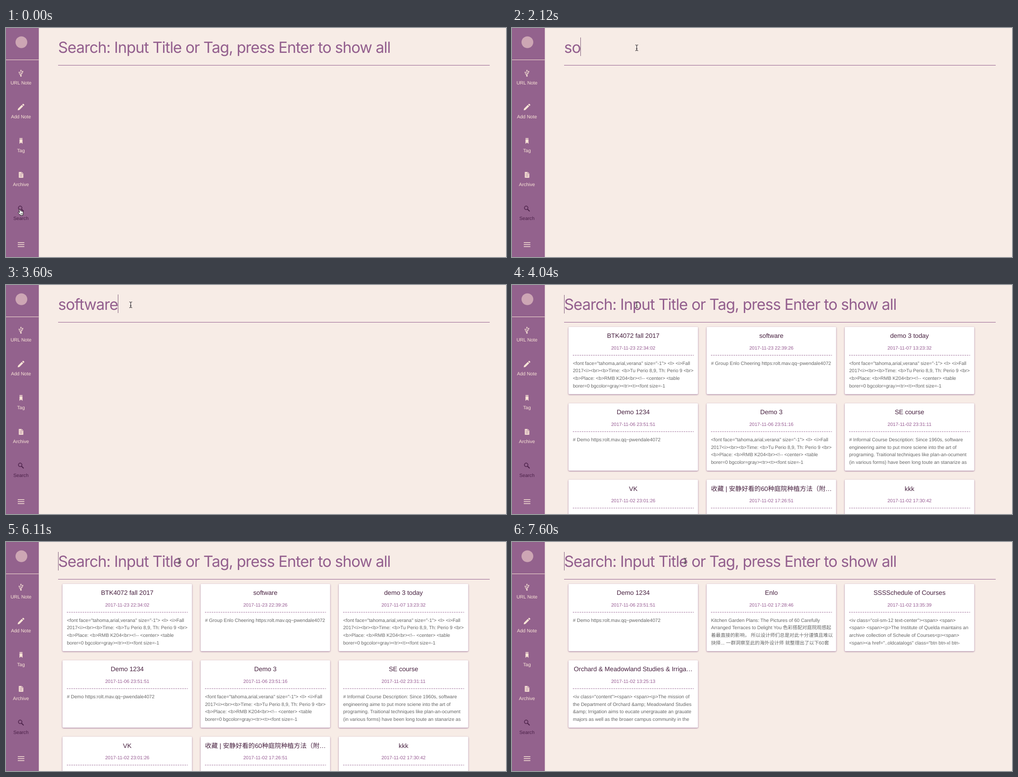
Recreate the animation shown at these times as an HTML page. Size 1104 by 507 pixels, loop 8000 ms.

```html
<!DOCTYPE html>
<html lang="en">
<head>
<meta charset="utf-8">
<title>Note search</title>
<style>
  html, body { margin: 0; width: 100%; height: 100%; overflow: hidden; background: #f7ece6; }
  svg { display: block; width: 100vw; height: 100vh; }
  text { font-family: "Liberation Sans", "Noto Sans CJK SC", "Noto Sans CJK", sans-serif; text-rendering: geometricPrecision; }
  .label { font-size: 10.6px; fill: #f9e4d6; text-anchor: middle; }
  .active { fill: #4b2149; }
  .query { font: 400 34px Inter, sans-serif; font-optical-sizing: none; letter-spacing: -1.04px; fill: #935f8e; }
  .card { fill: #fff; filter: drop-shadow(0 1px 1.4px rgba(105, 45, 105, .65)); }
  .title { font-size: 14.1px; fill: #47203f; text-anchor: middle; }
  .date { font-size: 10.6px; fill: #965a92; text-anchor: middle; }
  .body { font-size: 10.65px; fill: #666; }
</style>
</head>
<body>
<svg id="stage" viewBox="0 0 1104 507" preserveAspectRatio="xMinYMin meet">
  <rect width="1104" height="507" fill="#f7ece6"/>
  <rect width="72.5" height="507" fill="#93628d"/>
  <path d="M0 70.5H72.5" stroke="#f9e4d6"/>
  <circle cx="34" cy="31.5" r="13" fill="#cda6b4"/>

  <g fill="#f9e4d6">
    <g fill="none" stroke="#f9e4d6" stroke-width="1.2">
      <path d="M33 94V106M33 104.5Q29.3 103 29.3 98.5M33 102.5Q36.7 101.5 36.7 96.5"/>
    </g>
    <path d="M33 92L34.7 95H31.3Z"/>
    <circle cx="33" cy="106" r="1.7"/>
    <circle cx="29.3" cy="98" r="1.2"/>
    <rect x="35.5" y="95.2" width="2.4" height="2.4"/>

    <path d="M25.8 182.2L26.6 178.6L34.9 170.3L37.9 173.3L29.6 181.6ZM35.7 169.5L37 168.2Q37.9 167.4 38.8 168.2L40.1 169.5Q40.8 170.4 40.1 171.2L38.7 172.5Z"/>

    <path d="M29.8 243.8H36.4V245.6H29.8ZM29.8 246.4H36.4V256.4L33.1 253.6L29.8 256.4Z"/>

    <path d="M28.3 318.8H34.8L38.2 322.2V331.4H28.3Z"/>
    <path d="M34.5 319.2V322.5H37.8M30.2 322.2H32.8M30.2 325.2H36.3M30.2 328.2H36.3" fill="none" stroke="#93628d" stroke-width=".9"/>
  </g>
  <g fill="none" stroke="#4b2149">
    <circle cx="31.3" cy="398.2" r="3.9" stroke-width="1.5"/>
    <path d="M34.3 401.2L39 405.9" stroke-width="2"/>
  </g>
  <path d="M26 475.3H40.5M26 479.6H40.5M26 483.9H40.5" stroke="#f9e4d6" stroke-width="1.5"/>
  <g id="menu"></g>

  <path d="M115 82.5H1068" stroke="#935f8e"/>
  <g id="allNotes"></g>
  <g id="foundNotes"></g>
  <text id="query" class="query" x="115" y="55"></text>
  <rect id="caret" width="1" height="41" fill="#7d5a7a"/>

  <g id="hand" stroke="#111" stroke-width="1" stroke-linejoin="round">
    <path fill="#fff" d="M-2.6 -5.2Q-1.4 -6.6 -.3 -5L1 -1.6Q2 -2.4 2.8 -1.3Q3.9 -2 4.5 -.7Q5.6 -1.1 6 .2L6.6 3.2Q6.8 5.2 5.6 6.4V7.8L-.2 8V6.6L-4.6 2.6Q-5.4 1.2 -4.2 .8Q-3.1 .6 -1.5 2Z"/>
    <path fill="none" stroke-width=".7" d="M1 3L1.4 5.8M2.8 2.8L3.1 5.6M4.5 2.6L4.8 5.4"/>
  </g>
  <path id="arrow" fill="#111" stroke="#fff" stroke-width=".9" d="M0 0V12.5L2.9 9.8L4.8 14.2L6.8 13.3L4.9 9.1H8.9Z"/>
  <g id="beam" fill="none" stroke-linecap="round">
    <path stroke="#fff" stroke-opacity=".6" stroke-width="2.2" d="M0 -5.5V5.5"/>
    <path stroke="#1c161b" stroke-width="1.1" d="M-2.7 -6.3Q-.4 -6.3 0 -5Q.4 -6.3 2.7 -6.3M0 -5V5M-2.7 6.3Q-.4 6.3 0 5Q.4 6.3 2.7 6.3M-1.3 2.2H1.3"/>
  </g>
</svg>
<script>
const LOOP = 8000;
const PROMPT = "Search: Input Title or Tag, press Enter to show all";
const $ = id => document.getElementById(id);

function add(parent, tag, attrs, text) {
  const el = document.createElementNS("http://www.w3.org/2000/svg", tag);
  for (const key in attrs) el.setAttribute(key, attrs[key]);
  if (text) el.textContent = text;
  parent.append(el);
  return el;
}

["URL Note", "Add Note", "Tag", "Archive", "Search"].forEach((name, i) =>
  add($("menu"), "text", { class: name === "Search" ? "label active" : "label", x: 33, y: 125 + 75 * i }, name));

const markup = [
  '<font face="tahoma,arial,verana" size="-1"> <l> <i>Fall',
  "2017<i><br><b>Time: <b>Tu Perio 8,9, Th: Perio 9 <br>",
  "<b>Place: <b>RMB K204<br><!-- <center> <table",
  "borer=0 bgcolor=gray><tr><t><font size=-1"
];
const demo = ["Demo 1234", "2017-11-06 23:51:51", ["# Demo https:rolt.mav.qq~pwendale4072"]];

const allNotes = [
  ["BTK4072 fall 2017", "2017-11-23 22:34:02", markup],
  ["software", "2017-11-23 22:39:26", ["# Group Enlo Cheering https:rolt.mav.qq~pwendale4072"]],
  ["demo 3 today", "2017-11-07 13:23:32", markup],
  demo,
  ["Demo 3", "2017-11-06 23:51:16", markup],
  ["SE course", "2017-11-02 23:31:11", [
    "# Informal Course Description: Since 1960s, software",
    "engineering aime to put more sciene into the art of",
    "programing. Traitional techniques like plan-an-ocument",
    "(in various forms) have been long toute an stanarize as"]],
  ["VK", "2017-11-02 23:01:26", []],
  ["收藏 | 安静好看的60种庭院种植方法（附…", "2017-11-02 17:26:51", []],
  ["kkk", "2017-11-02 17:30:42", []]
];
const foundNotes = [
  demo,
  ["Enlo", "2017-11-02 17:28:46", [
    "Kitchen Garden Plans: The Pictures of 60 Carefully",
    "Arranged Terraces to Delight You 色彩搭配对庭院观感起",
    "着最直接的影响， 所以设计师们总是对此十分谨慎且难以",
    "抉择... 一群洞察至此的海外设计师 就整理出了以下60套"]],
  ["SSSSchedule of Courses", "2017-11-02 13:35:39", [
    '<iv class="col-sm-12 text-center"><span> <span>',
    "<span> <span><p>The Institute of Quelda maintains an",
    "archive collection of Scheule of Courses<p><span>",
    '<span><a href="..oldcatalogs" class="btn btn-xl btn-']],
  ["Orchard & Meadowland Studies & Irriga…", "2017-11-02 13:25:13", [
    '<iv class="content"><span> <span><p>The mission of',
    "the Department of Orchard &amp; Meadowland Studies",
    "&amp; Irrigation aims to eucate unergrauate an grauate",
    "majors as well as the broaer campus community in the"]]
];

function drawNotes(group, notes) {
  notes.forEach(([title, date, lines], i) => {
    const x = 124.7 + 305 * (i % 3), y = 92.7 + 169.2 * Math.floor(i / 3);
    const card = add(group, "g", { transform: `translate(${x} ${y})` });
    add(card, "rect", { class: "card", width: 286, height: 149, rx: 2 });
    add(card, "text", { class: "title", x: 143, y: 24.5 }, title);
    add(card, "text", { class: "date", x: 143, y: 50 }, date);
    add(card, "path", { d: "M9.7 62.8H276.7", stroke: "#935f8e", "stroke-dasharray": "3 2" });
    lines.forEach((line, n) => add(card, "text", { class: "body", x: 9.7, y: 84 + 16.7 * n }, line));
  });
}
drawNotes($("allNotes"), allNotes);
drawNotes($("foundNotes"), foundNotes);

// Start time of each typed state; an empty string shows the prompt.
const typing = [
  [0, ""], [1970, "s"], [2120, "so"], [2410, "sof"], [2560, "soft"], [2850, "softw"],
  [3150, "softwa"], [3450, "softwar"], [3600, "software"], [4040, ""],
  [6560, "1"], [6860, "12"], [7150, "123"], [7600, ""]
];
const caretOn = [[1370, 1820], [1970, 4640], [5080, 5520], [6110, LOOP]];

// Progress of a move that advances in equal jumps, the first at start, the last at end.
function jumps(t, start, end, count) {
  if (t < start) return 0;
  const done = Math.floor((t - start) / (end - start) * (count - 1) + 0.02) + 1;
  return Math.min(1, done / count);
}
const ease = p => p * p * (3 - 2 * p);

function pointer(t) {
  const up = ease(jumps(t, 450, 1070, 5));
  const p = jumps(t, 4640, 5520, 7);
  return {
    x: 31.6 + 243.8 * up + 107 * ease(p),
    y: 407 - 363.2 * up - 1.8 * p + 33 * Math.sin(Math.PI * p)
  };
}

function show(el, on) {
  el.style.display = on ? "" : "none";
}

function render(t) {
  const typed = typing.filter(([start]) => start <= t).pop()[1];
  const query = $("query"), text = typed || PROMPT;
  if (query.textContent !== text) query.textContent = text;

  const caret = $("caret");
  show(caret, caretOn.some(([from, to]) => t >= from && t < to));
  caret.setAttribute("x", typed ? Math.floor(115 + query.getComputedTextLength()) : 115);
  caret.setAttribute("y", typed ? 21 : 22);

  show($("allNotes"), t >= 4040 && t < 7600);
  show($("foundNotes"), t >= 7600);

  const { x, y } = pointer(t);
  const kind = t < 450 ? "hand" : y < 82 ? "beam" : "arrow";
  for (const id of ["hand", "arrow", "beam"]) show($(id), id === kind);
  $(kind).setAttribute("transform", `translate(${x.toFixed(2)} ${y.toFixed(2)})`);
}

const began = performance.now();
function tick() {
  render((performance.now() - began) % LOOP);
  requestAnimationFrame(tick);
}
tick();
</script>
</body>
</html>
```
